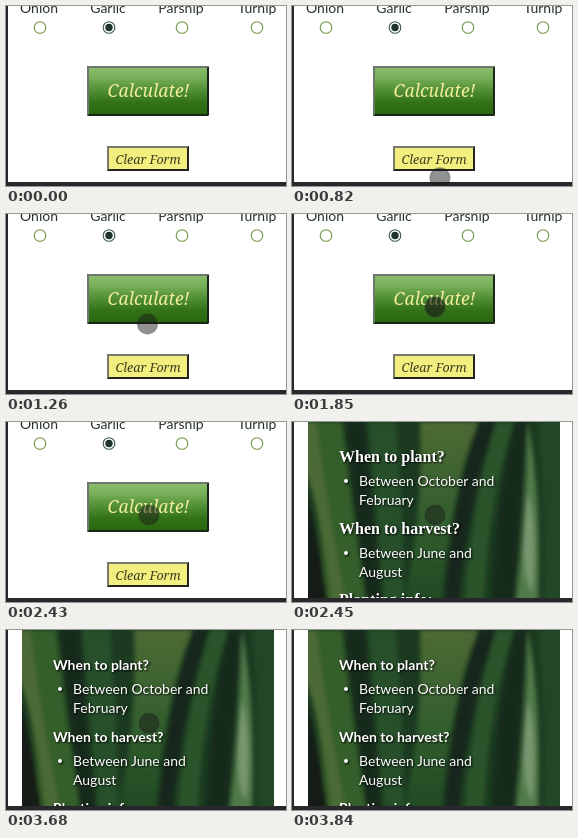
An HTML page that plays this animation: 280 px wide and 180 px high, repeating every 5.42 s.

```html
<!DOCTYPE html>
<html lang="en">
<head>
<meta charset="utf-8">
<title>Vegetable form</title>
<style>
html, body { margin: 0; width: 100%; height: 100%; overflow: hidden; background: #fff; }
svg { display: block; }
text { font: 14px Lato, "Open Sans", sans-serif; }
#form .button { font-family: "Noto Serif", serif; font-style: italic; text-anchor: middle; }
#labels text { text-anchor: middle; fill: #26352a; }
#info text { fill: #fff; }
#info .head { font-weight: 700; }
#info.early .head { font: 700 16px "Liberation Serif", serif; }
.shade { filter: drop-shadow(1px 1px 1px #000); }
</style>
</head>
<body>
<svg width="280" height="180" viewBox="0 0 280 180">
  <defs>
    <linearGradient id="green" x2="0" y2="1">
      <stop stop-color="#86bc6b"/>
      <stop offset=".2" stop-color="#79b05b"/>
      <stop offset=".5" stop-color="#4f8d34"/>
      <stop offset=".75" stop-color="#347219"/>
      <stop offset="1" stop-color="#2a680f"/>
    </linearGradient>
    <linearGradient id="leaf" x2="0" y2="1">
      <stop stop-color="#4d6a34"/>
      <stop offset=".5" stop-color="#35602f"/>
      <stop offset="1" stop-color="#1f4a24"/>
    </linearGradient>
    <filter id="soft" x="-20%" y="-20%" width="140%" height="140%"><feGaussianBlur stdDeviation="2"/></filter>
    <clipPath id="photo"><path d="M16 0H268V176H16z"/></clipPath>
  </defs>
  <rect width="280" height="180" fill="#fff"/>

  <g id="form">
    <g id="labels"></g>
    <rect x="81" y="60" width="122" height="50" rx="1.5" fill="#1b2518"/>
    <path d="M81 110V60H203L201 62H83V108z" fill="#6d7668"/>
    <rect x="83" y="62" width="118" height="46" fill="url(#green)"/>
    <text class="button" x="142.5" y="91" style="font-size:17.5px" fill="#f2ee9a">Calculate!</text>
    <rect x="101" y="140" width="82" height="25" fill="#222"/>
    <path d="M101 165V140H183L181 142H103V163z" fill="#77776a"/>
    <rect x="103" y="142" width="78" height="21" fill="#f3ef7f"/>
    <text class="button" x="142" y="158" style="font-size:12.5px;font-weight:500" fill="#3c3c22">Clear Form</text>
  </g>

  <g id="info" clip-path="url(#photo)">
    <rect x="16" width="252" height="176" fill="#1b3a20"/>
    <g filter="url(#soft)">
      <path d="M10 0H50Q60 90 74 180H34Q28 80 10 30z" fill="#365f2b"/>
      <path d="M10 0H24Q34 80 54 180H40Q30 90 10 40z" fill="#4c6a34"/>
      <path d="M10 60Q26 110 36 180H10z" fill="#141d17"/>
      <path d="M52 0H74Q80 90 90 180H74Q64 90 52 0z" fill="#182a1b"/>
      <path d="M76 0H104Q112 90 112 180H92Q84 90 76 0z" fill="#27502a"/>
      <path d="M128 0H186Q158 70 150 180H112Q132 90 128 0z" fill="url(#leaf)"/>
      <path d="M186 0H204Q176 80 166 180H152Q160 80 186 0z" fill="#16281a"/>
      <path d="M204 0H222Q196 80 192 180H172Q180 80 204 0z" fill="#2b542b"/>
      <path d="M222 0H236Q228 90 222 180H200Q204 80 222 0z" fill="#182c1b"/>
      <path d="M236 0Q250 80 246 180H224Q234 90 236 0z" fill="#517a4a"/>
      <path d="M236 70Q246 110 240 170Q226 150 236 70z" fill="#789771"/>
      <path d="M246 0H274V180H252Q254 90 246 0z" fill="#214725"/>
    </g>
    <g id="copy" class="shade"></g>
  </g>

  <path d="M0 0H2V176H280V180H0z" fill="#28282c"/>
  <circle id="dot" r="10" stroke="#222" stroke-opacity=".25" stroke-width="1.5"/>
</svg>
<script>
const LOOP = 5420;
const $ = id => document.getElementById(id);
const label = (x, y, words, kind = "") => `<text class="${kind}" x="${x}" y="${y}">${words}</text>`;

$("labels").innerHTML = [["Onion", 33, 34], ["Garlic", 102, 103], ["Parsnip", 175, 176], ["Turnip", 251, 251]]
  .map(([name, x, cx]) => {
    const on = name === "Garlic";
    return label(x, 7, name) +
      `<circle cx="${cx}" cy="21.5" r="5.8" fill="#fff" stroke="${on ? "#3d574c" : "#739648"}" stroke-width="1.1"/>` +
      (on ? `<circle cx="${cx}" cy="21.5" r="3.7" fill="#1c352f"/>` : "");
  }).join("");

$("copy").innerHTML =
  label(47, 40, "When to plant?", "head") +
  label(67, 64, "Between October and") + label(67, 83, "February") +
  label(47, 112, "When to harvest?", "head") +
  label(67, 136, "Between June and") + label(67, 155, "August") +
  label(47, 183, "Planting info:", "head") +
  [59, 131].map(y => `<circle cx="54" cy="${y}" r="2" fill="#fff"/>`).join("");

// Pointer path: time, x, y
const path = [
  [820, 148, 172], [880, 145, 154], [940, 142.5, 137.5], [1080, 141, 121], [1260, 141.5, 110],
  [1350, 142, 106.5], [1370, 142, 106], [1440, 142.5, 98], [1540, 143, 93.5],
  [1800, 143, 93], [3680, 143, 93], [3740, 146, 112], [3820, 158, 165], [3840, 160, 178]
];

function place(t) {
  const i = path.findIndex(p => p[0] > t);
  if (i < 1) return null;
  const [a, b] = [path[i - 1], path[i]];
  const k = (t - a[0]) / (b[0] - a[0]);
  return [1, 2].map(n => a[n] + (b[n] - a[n]) * k);
}

function draw() {
  const t = performance.now() % LOOP;
  const done = t >= 2450;
  $("form").style.display = done ? "none" : "";
  $("info").style.display = done ? "" : "none";
  // The heading face arrives a moment after the page
  $("info").classList.toggle("early", t < 2700);

  const dot = $("dot"), at = place(t);
  dot.style.display = at ? "" : "none";
  if (at) {
    const pressed = t >= 1800 && t < 2330;
    dot.setAttribute("transform", `translate(${at})`);
    dot.setAttribute("fill", `rgba(25,25,25,${pressed ? .62 : .48})`);
  }
  requestAnimationFrame(draw);
}
draw();
</script>
</body>
</html>
```
